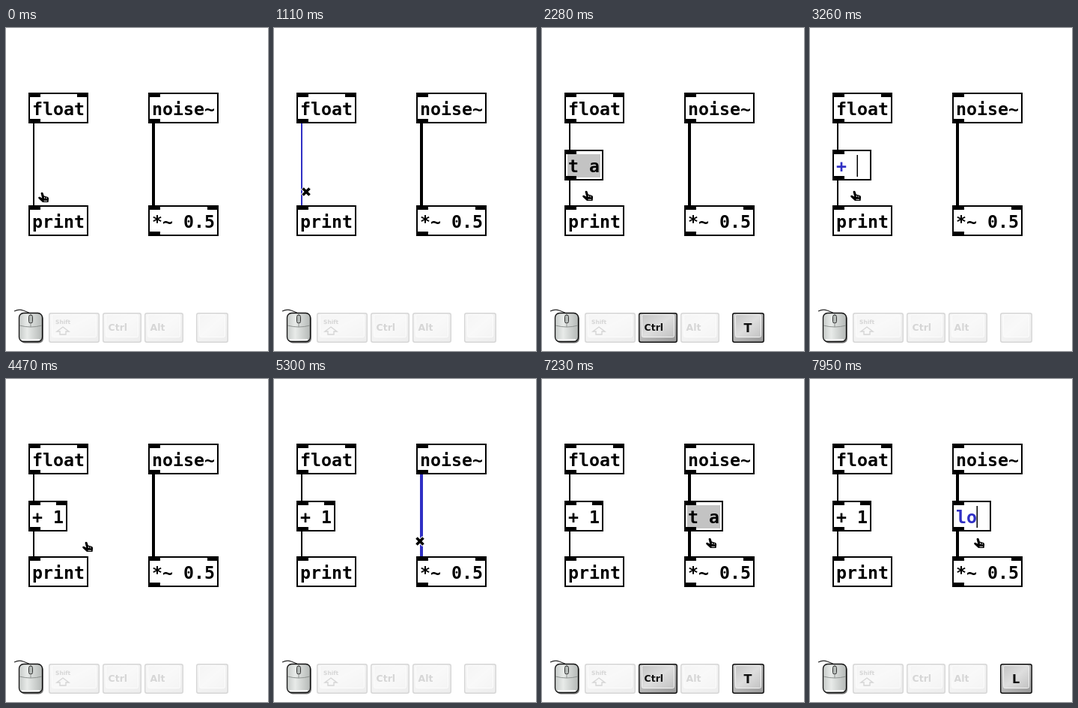
Write an HTML page that moves like this. It is 350x430 px and loops after 7.99 s.

```html
<!DOCTYPE html>
<html lang="en">
<head>
<meta charset="utf-8">
<title>Inserting objects into patch cords</title>
<style>
html, body { margin: 0; width: 100%; height: 100%; overflow: hidden; background: #fff; }
svg { display: block; }
.box { fill: #fff; stroke: #000; stroke-width: 2; }
.code { font: bold 23.25px "DejaVu Sans Mono", monospace; white-space: pre; }
.label { font-family: "DejaVu Sans", sans-serif; font-weight: bold; fill: #111; }
.outline { stroke: #fff; stroke-width: 2; stroke-linejoin: round; paint-order: stroke; }
.key { opacity: .17; }
.key.on { opacity: 1; }
</style>
</head>
<body>
<svg width="350" height="430" viewBox="0 0 350 430">
  <defs>
    <linearGradient id="side" x2="1" y2="1"><stop stop-color="#d4d4d4"/><stop offset="1" stop-color="#989898"/></linearGradient>
    <linearGradient id="cap" x2="1" y2="1"><stop stop-color="#c4c4c4"/><stop offset=".5" stop-color="#dedede"/><stop offset="1" stop-color="#c2c2c2"/></linearGradient>
    <linearGradient id="shell" x2="1" y2="0"><stop stop-color="#c6cac8"/><stop offset=".35" stop-color="#e8ebe9"/><stop offset="1" stop-color="#b4b8b6"/></linearGradient>
  </defs>
  <g id="patch"></g>
  <g id="keys"></g>
  <g>
    <path d="M11 377Q17 374 23 376T34 381" fill="none" stroke="#222" stroke-width="1.2"/>
    <rect x="19" y="381" width="31" height="38.500" rx="6" fill="#777"/>
    <rect x="17.500" y="379.500" width="31" height="38" rx="6" fill="url(#shell)" stroke="#111" stroke-width="1.300"/>
    <path d="M18 396Q33 400 48 396M33 380V382M33 394V398" fill="none" stroke="#8d918f"/>
    <path d="M21 415H45" stroke="#f4f4f4" stroke-width="2"/>
    <rect x="30.500" y="382" width="5" height="11" rx="2.500" fill="#b5bbb8" stroke="#333"/>
  </g>
  <g id="cursor">
    <g id="hand">
      <path class="outline" d="M-1.500 1Q-.5-1 1.500.5L2.800 4.500 8 6Q9.500 7 9 9.500L8.500 13H1L-4.500 8Q-5.500 5.500-3 5.800L.2 7.500Z"/>
      <path d="M3.500 6V8M6 6.500V8.500M2.500 11.300H7" stroke="#fff" stroke-width=".9"/>
    </g>
    <g id="cross" fill="none">
      <path d="M-5-5 5 5M5-5-5 5" stroke="#fff" stroke-width="5.500"/>
      <path d="M-4.500-4.500 4.500 4.500M4.500-4.500-4.500 4.500" stroke="#000" stroke-width="3.600"/>
    </g>
    <path id="arrow" class="outline" d="M0 0V14.500L3.300 11.500 6 17.500 8.500 16.300 6 10.600H10.300Z"/>
  </g>
</svg>
<script>
const LOOP = 7990, BLUE = '#3030c4';
const $ = id => document.getElementById(id);

function add(parent, tag, attrs, text) {
  const el = document.createElementNS('http://www.w3.org/2000/svg', tag);
  for (const k in attrs) el.setAttribute(k, attrs[k]);
  if (text) el.textContent = text;
  parent.append(el);
  return el;
}
const rect = (parent, x, y, width, height, extra) => add(parent, 'rect', { x, y, width, height, ...extra });
const show = (el, on) => { el.style.display = on ? '' : 'none'; };

// Object box; ports: i/I = left/right inlet, o = left outlet
function object(x, y, chars, text, ports) {
  const g = add($('patch'), 'g', {}), w = chars * 14 + 10;
  rect(g, x + 1, y + 1, w - 2, 39, { class: 'box' });
  const select = rect(g, x + 4, y + 6, 44, 31, { fill: '#c3c3c3' });
  const right = rect(g, x + w - 15, y, 15, 6);
  if (ports.includes('i')) rect(g, x, y, 16, 6);
  if (ports.includes('o')) rect(g, x, y + 35, 16, 6);
  show(right, ports.includes('I'));
  show(select, false);
  const code = add(g, 'text', { x: x + 5, y: y + 30, class: 'code' }, text);
  const caret = rect(g, 0, y + 7, 1.5, 29);
  show(caret, false);
  return { g, x, select, right, code, caret };
}

function edit(o, visible, text, mode) {
  show(o.g, visible);
  show(o.select, mode === 'select');
  show(o.caret, mode === 'type');
  show(o.right, mode === 'done');
  o.code.textContent = text;
  o.code.setAttribute('fill', mode === 'type' ? BLUE : '#000');
  o.caret.setAttribute('x', o.x + 4.5 + text.length * 14);
}

function key(x, w, text, size, tx, ty) {
  const g = add($('keys'), 'g', { class: 'key' });
  rect(g, x + .7, 379.7, w - 1.4, 38.6, { rx: 2.5, fill: 'url(#side)', stroke: '#111', 'stroke-width': 1.4 });
  rect(g, x + 4.5, 381.5, w - 9, 30, { rx: 2, fill: 'url(#cap)', stroke: '#f2f2f2' });
  g.label = add(g, 'text', { x: tx, y: ty, class: 'label', 'font-size': size }, text);
  return g;
}

const wires = [rect($('patch'), 36, 126, 2, 111), rect($('patch'), 195, 126, 4, 111)];
object(30, 86, 5, 'float', 'iIo');
object(190, 86, 6, 'noise~', 'io');
object(30, 236, 5, 'print', 'i');
object(190, 236, 6, '*~ 0.5', 'iIo');
const left = object(30, 162, 3, '', 'io');
const right = object(190, 162, 3, '', 'io');

const shift = key(57, 68, 'Shift', 7.5, 66, 394);
add(shift, 'path', { d: 'M76 398L84 404H80V408H72V404H68Z', fill: 'none', stroke: '#111', 'stroke-width': 1.4 });
const ctrl = key(129, 52, 'Ctrl', 12.5, 136.5, 402.5);
key(185, 52, 'Alt', 12.5, 192.5, 402.5);
const letter = key(254, 43, '', 16, 275, 404.5);
letter.label.setAttribute('text-anchor', 'middle');

const easeIn = p => p ** 1.39, easeOut = p => 1 - (1 - p) ** 2.56, smooth = p => p * p * (3 - 2 * p);
const start = [48, 219];
const moves = [
  { from: 370, to: 640, steps: 7, at: [37.5, 218.5], ease: smooth },
  { from: 1030, to: 1350, steps: 8, at: [59, 217], ease: easeIn },
  { from: 4390, to: 5150, steps: 19, at: [194.5, 216], ease: easeOut },
  { from: 5570, to: 5820, steps: 7, at: [224, 212], ease: smooth }
];

function pointer(t) {
  let pos = start;
  for (const m of moves) {
    if (t < m.from) break;
    const n = Math.floor((t - m.from) / (m.to - m.from) * (m.steps - 1) + .3) + 1;
    const p = m.ease(Math.min(1, n / m.steps));
    pos = pos.map((v, i) => v + (m.at[i] - v) * p);
  }
  return pos;
}

// Last entry whose time has come
const pick = (list, t) => list.filter(e => t >= e[0]).pop().slice(1);
const leftText = [[0, '', ''], [2080, 't a', 'select'], [2960, '+', 'type'], [3220, '+ ', 'type'], [3540, '+ 1', 'type'], [4050, '+ 1', 'done']];
const rightText = [[0, '', ''], [7040, 't a', 'select'], [7740, 'l', 'type'], [7950, 'lo', 'type']];
const letters = [[0, ''], [2040, 'T'], [2690, ''], [7000, 'T'], [7600, ''], [7740, 'L']];

function draw(t) {
  const within = (a, b) => t >= a && t < b;
  edit(left, t >= 2080, ...pick(leftText, t));
  edit(right, t >= 7040, ...pick(rightText, t));
  wires[0].setAttribute('fill', within(850, 2080) ? BLUE : '#000');
  wires[1].setAttribute('fill', within(5300, 7040) ? BLUE : '#000');

  const [char] = pick(letters, t);
  letter.label.textContent = char;
  letter.classList.toggle('on', char !== '');
  ctrl.classList.toggle('on', within(1610, 2750) || within(6380, 7640));

  const [x, y] = pointer(t);
  const arrow = within(1650, 2280) || within(6420, 7230);
  const cross = !arrow && Math.min(Math.abs(x - 37), Math.abs(x - 197)) < 8;
  $('cursor').setAttribute('transform', `translate(${Math.round(x)} ${Math.round(y)})`);
  show($('arrow'), arrow);
  show($('cross'), cross);
  show($('hand'), !arrow && !cross);
}

const begin = performance.now();
function tick() {
  draw((performance.now() - begin) % LOOP);
  requestAnimationFrame(tick);
}
tick();
</script>
</body>
</html>
```
